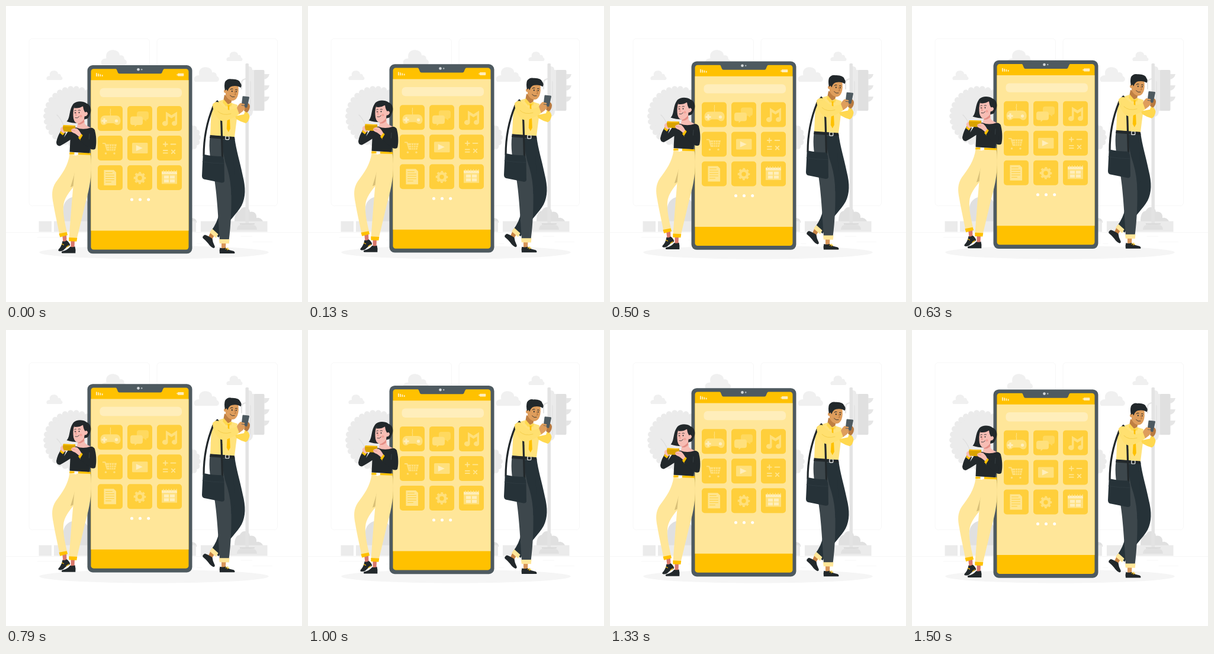
These frames come from a looping animation (500x500 px, 1540 ms). An HTML page:

```html
<!DOCTYPE html>
<html lang="en">
<head>
<meta charset="utf-8">
<title>Phone apps</title>
<style>
html, body { margin: 0; width: 100%; height: 100%; overflow: hidden; background: #fff; }
svg { display: block; width: 100vw; height: 100vh; }
.ln { fill: none; stroke-linecap: round; stroke-linejoin: round; }
</style>
</head>
<body>
<svg viewBox="0 0 500 500">
  <defs>
    <path id="cloud" d="M1.500 16C-1.500 12 2 9 6 9C4.500 3 9-.5 14 .3C19 1 20 4 20 6C24 5 25 8 25 10C28 11 28.500 15 25.500 16Z"/>
  </defs>

  <!-- scenery -->
  <g fill="none" stroke="#ebebeb" stroke-width=".4">
    <rect x="39" y="55" width="203.500" height="282.600" rx="5.500"/>
    <rect x="255" y="55" width="203.500" height="282.600" rx="5.500"/>
    <path d="M0 382.500H500M416.800 398.600h33M322.500 401.300h8.700M396.600 389.300h19M52.500 391h43M131.500 395.200h93"/>
  </g>
  <g fill="#f0f0f0">
    <use href="#cloud" transform="translate(68 109)"/>
    <use href="#cloud" transform="translate(160 74) scale(1.600)"/>
    <use href="#cloud" transform="translate(372 77)"/>
    <use href="#cloud" transform="translate(317 103) scale(1.560)"/>
  </g>
  <g id="trees" fill="#ebebeb"></g>
  <path class="ln" d="M86 184Q92 189 97 201" stroke="#dedede" stroke-width="1.300"/>
  <g fill="#e0e0e0">
    <path d="M97 364V341C98 327 111 320 124 322C134 323 140 331 140 340V364Z"/>
    <path d="M313 358q9 0 9 8h-9z"/>
    <path d="M386 364C386 354 388 347 395 346C399 337 411 338 412 348C419 346 424 351 423 358C428 357 433 360 434 364Z"/>
  </g>
  <g fill="#ebebeb">
    <rect x="55.500" y="363.500" width="21.500" height="18"/>
    <rect x="81" y="363.500" width="60" height="18"/>
    <rect x="313" y="363.500" width="8" height="18"/>
    <rect x="329" y="363.500" width="112.500" height="18"/>
  </g>
  <rect x="404.500" y="97" width="5.500" height="274" rx="1.500" fill="#e3e3e3"/>
  <path d="M390 378q0-9 10-9h14q10 0 10 9z" fill="#e0e0e0"/>
  <path d="M395 367h25v2h-25z" fill="#dadada"/>
  <path d="M410 102q6 0 6 6h6v69h-5q0 9-7 10z" fill="#ebebeb"/>
  <rect x="419" y="108" width="17.500" height="69" rx="2" fill="#e0e0e0"/>
  <path d="M436 115h9q-2 8-9 9zM436 134h9q-2 8-9 9zM436 153h9q-2 8-9 9z" fill="#e6e6e6"/>
  <path class="ln" d="M398 140v-10q0-6 7-7M413 128v48" stroke="#e4e4e4" stroke-width="2"/>
  <ellipse cx="250" cy="416.200" rx="193.900" ry="11.300" fill="#f5f5f5"/>

  <g id="float">
    <!-- phone -->
    <rect x="137.500" y="100" width="177" height="318.300" rx="9" fill="#4e5a60"/>
    <rect x="143.500" y="106.300" width="165" height="305.200" rx="4.500" fill="#ffc100"/>
    <path d="M143.500 125.300h165V379.500h-165z" fill="#ffe699"/>
    <path d="M185 105.500h83q-2 .5-3.200 3.800l-1.300 3.200q-.6 1.800-2.500 1.800h-69.500q-1.900 0-2.500-1.800l-1.300-3.200q-1-3.300-2.700-3.800z" fill="#4e5a60"/>
    <circle cx="223.500" cy="107.200" r="2.300" fill="#d4d8da"/>
    <circle cx="229.200" cy="107.200" r="1.300" fill="#aab2b6"/>
    <g fill="#ffeebb">
      <path d="M152 113.300h1.800v5.700h-1.800zM155.200 114.200h1.800v4.800h-1.800zM158.400 115.200h1.800v3.800h-1.800zM161.800 116.200h1.800v2.800h-1.800z"/>
      <rect x="290" y="113.800" width="10.300" height="4.800" rx=".8"/>
      <rect x="288.300" y="115.200" width="1.500" height="2" rx=".5"/>
      <rect x="158.500" y="138.700" width="138.500" height="15.300" rx="6"/>
    </g>
    <g id="tiles" fill="#ffcf3b"></g>

    <g fill="#ffe07c">
      <path d="M167 185h19c5 0 7.500 4 7.500 8.500s-2 7.500-5.500 7.500c-4 0-4-3-7-3h-9c-3 0-3 3-7 3c-3.500 0-5.500-3-5.500-7.500s2.500-8.500 7.500-8.500z"/>
      <path class="ln" d="M176.500 185v-4q-1-1 0-3v-4" stroke="#ffe07c" stroke-width="1.200"/>
      <path d="M164.500 189.500h3v3h3v3h-3v3h-3v-3h-3v-3h3z" fill="#ffeebb"/>
      <circle cx="186.500" cy="194" r="2.600" fill="#ffeebb"/>
      <path d="M225 178h12q4 0 4 4v6q0 4-4 4v3l-4-3h-8q-4 0-4-4v-6q0-4 4-4z" fill="#ffd95f"/>
      <path d="M214 186.500h13q4 0 4 4v6.500q0 4-4 4h-6l-3.500 3v-3h-3.500q-4 0-4-4v-6.500q0-4 4-4z"/>
      <path d="M270 178.500l9.500 6l9.500-6v19.500a4.500 4 0 1 1-3.500-3.600v-8.400l-6 3.800l-6-3.800v12a4.800 4.200 0 1 1-3.500-3.600z"/>
      <path d="M163 231.200h5l1 2.300h18l-2.500 11h-14.500l-3.400-11.500h-3.600z"/>
      <path class="ln" d="M170 237.300h15.500M171 241h14M174.500 234.500l1 9.500M178.500 234.500v9.500M182.500 234.500l-1 9.500" stroke="#ffcf3b" stroke-width=".9"/>
      <circle cx="168.500" cy="249" r="1.700"/><circle cx="183" cy="249" r="1.700"/>
      <rect x="213" y="231" width="26.500" height="18" rx="1.500"/>
      <path d="M219.800 235l11 5l-11 5z" fill="#ffeebb"/>
      <path class="ln" d="M269.300 230v7M265.800 233.500h7M278.500 233.500h8M265.800 244h7M265.800 248.300h7M279.800 243.500l5.500 5.500M285.300 243.500l-5.500 5.500" stroke="#ffe58f" stroke-width="1.800"/>
      <path d="M165.500 277h16.500l4 4v22h-20.500z" fill="#ffe58f"/>
      <path class="ln" d="M168.500 281.500h11M168.500 285.500h14M168.500 289.500h14M168.500 293.500h14M168.500 297.500h9" stroke="#ffcf3b" stroke-width="1"/>
      <circle cx="226" cy="290.500" r="6" fill="none" stroke="#ffe07c" stroke-width="4.500"/>
      <circle cx="226" cy="290.500" r="9" fill="none" stroke="#ffe07c" stroke-width="2.600" stroke-dasharray="3.800 3.269" stroke-dashoffset="1.900"/>
      <path d="M263 279.500h26v21h-26z"/>
      <path d="M263 279.500h26v4.500h-26z" fill="#ffeebb"/>
      <path class="ln" d="M266 277.800v3M270.500 277.800v3M275 277.800v3M279.500 277.800v3M284 277.800v3M288 277.800v3" stroke="#ffe58f" stroke-width="1.300"/>
      <path d="M267 286.500h8v5h-8zM277 286.500h8v5h-8zM267 293h8v5h-8zM277 293h8v5h-8z" fill="#ffeebb"/>
    </g>
    <g fill="#fff">
      <circle cx="212.500" cy="327" r="2.500"/><circle cx="226.500" cy="327" r="2.500"/><circle cx="240.700" cy="327" r="2.500"/>
    </g>

    <!-- woman -->
    <g>
      <path d="M95 386l7-1l.5 12l-6 2z" fill="#d9786b"/>
      <path d="M109.500 396h6.500l-.5 12h-6z" fill="#d9786b"/>
      <path d="M95.500 397q3 2 7-1q2 1 4 4q2.500 3 1 5q-5 2-9 6q-3 3.500-8 3.200q-3.500-.5-1.500-3.200q5-5 6.500-14z" fill="#22282b"/>
      <path d="M108.500 406.500q4 1.500 8-.3q1.500 5 .8 11.300h-22.500q-2-1.500 0-3q9-2 13.700-8z" fill="#22282b"/>
      <path class="ln" d="M94.500 402l3 1.500M102 407.500l4-3" stroke="#ffc100" stroke-width="1.200"/>
      <path d="M107.500 250C105 270 95 283 84 298C77 309 77 319 80 334C83 352 87 368 90.500 387L103.500 384C99 365 96 350 97 338C98 325 106 315 116 303L128 255Z" fill="#ffe699"/>
      <path d="M118 268C117 283 112 295 109 306L119 302Z" fill="#d9c078"/>
      <path d="M119 250C116 275 114 300 112 322C110 345 108 372 106.500 393L119.500 394C126 368 131 345 137 322C143 300 146 275 142.500 250Z" fill="#ffe699"/>
      <path d="M89.500 384.500l13-2.500l1.700 5l-13 3.500zM106.300 391l14 .8l-1 6l-13-.6z" fill="#ffc100"/>
      <path d="M107.500 247l35 1.300l.8 3.500l-36.300-1.300z" fill="#ffc100"/>
      <rect x="115.500" y="246.700" width="6.500" height="5" rx="1" fill="#fff"/>
      <!-- hair, face -->
      <path d="M114 165C119 160 130 160 136 164.500C144 167 145 178 141.500 183C140 188 138 191 134 191L121 198C115 198 108 197 102.500 195C109 189 106 175 114 165Z" fill="#22282b"/>
      <path d="M121 192L132 187L133 199Q136 203 145 206L134 212L118 207Q122 203 121 192Z" fill="#f7bdb4"/>
      <path d="M121.500 197Q128 197 132 191V196Q127 201 121.500 200Z" fill="#e58f86"/>
      <path d="M115 171C120 170 128 168 132 170Q132 175 133.500 179Q138 178 138 182.500Q136 187 133 186Q131 195 123 198.500Q116 199 114 190Q112.500 180 115 171Z" fill="#f7bdb4"/>
      <path d="M114 172Q123 174 130 169Q131 177 134 180L139 170L128 163Z" fill="#22282b"/>
      <g class="ln" stroke="#22282b" stroke-width=".8">
        <path d="M115.500 177q1.500-1.500 3-.7M122 176.300q2-1 3.500 0"/>
        <path d="M119 179.500l-1.500 5h1.800" stroke="#e07f76"/>
        <path d="M117 188.800q4 1.500 6.500-2"/>
      </g>
      <ellipse cx="116.800" cy="180.300" rx=".8" ry="1.200" fill="#22282b"/>
      <ellipse cx="123.500" cy="180" rx=".8" ry="1.200" fill="#22282b"/>
      <circle cx="126.500" cy="186" r="2" fill="#f2a097"/>
      <!-- top and arms -->
      <path d="M109 206Q114 205 119 205.500Q130 210 143 205.500Q150 206 150.500 212C153 222 153 234 151 241Q148 244 142 241L140.500 248.500L107.500 246.500L108.500 226Q98 233 91 236.500Q85 236 85 230Q87 219 94 209L101 214L98 222Z" fill="#22282b"/>
      <path d="M141 216Q139 228 141 240M130 225l10 11" class="ln" stroke="#3b4448" stroke-width=".8"/>
      <path d="M94 208.500l5.500 5.500l-3.500 4.500l-5-4z" fill="#ffc100"/>
      <path d="M92 210Q91 206 95 204L101 207Q102 212 98 215Q94 214 92 210Z" fill="#f7bdb4"/>
      <path d="M97 201.300L117 202Q118 207 114.500 213L98 212Q94.500 207 97 201.300Z" fill="#d9a200"/>
      <path d="M97 201.300L117 202L114 203.500L96 203Z" fill="#ffc100"/>
      <path d="M110 209Q114 205.500 120 207Q124 210 127.500 217L124 222Q119 216 114 214.500Q110 213 110 209Z" fill="#f7bdb4"/>
      <path d="M111 209.500l5.500 1.300" class="ln" stroke="#e58f86" stroke-width=".8"/>
      <path d="M122 222.500l5.500-6.500l3 3.500l-4.500 8z" fill="#ffc100"/>
      <path d="M130 218Q138 225 147 229L146 242Q135 238 125 226Z" fill="#22282b"/>
    </g>

    <!-- man -->
    <g>
      <path d="M346 381l7 5l-5 8l-6-4z" fill="#c98546"/>
      <path d="M364 398h7.500l-.5 12h-7z" fill="#d9975a"/>
      <path d="M336 386.500q4 1 6 2.500q4 2 6.500 4q.5 6 4 12.500q1 3-2 3.500q-5-2-9-8q-4-5-9-9q-1.500-3 3.500-5.500z" fill="#22282b"/>
      <path d="M361.300 408.500q5 1.500 9.500 0q5 4 13.700 5.500q3 2 1.500 4h-25q-1-5 .3-9.500z" fill="#22282b"/>
      <path class="ln" d="M371 410.500l4-1.700M373.500 412l3-1.500" stroke="#ffc100" stroke-width="1.100"/>
      <path d="M362 223L386 222C389 245 395 262 400 287C405 307 405 323 398 337C390 351 376 363 369 376L359 391L346.500 380Q357 366 360 350Z" fill="#263238"/>
      <path d="M348.500 376.500l10 9l-3.500 6.500l-11-9.500z" fill="#ffe699"/>
      <path d="M344.500 221C342 240 345 260 350 282C356 310 358 350 361 396H376.500C380 370 381 340 380.500 315L379 223Z" fill="#3d474c"/>
      <path d="M366 226Q365 250 374 275Q380 295 380.500 320L387 300L382 225Z" fill="#263238"/>
      <path d="M360 394h17.500l-.7 7.300l-16-.3z" fill="#ffe699"/>
      <path d="M344.800 217.500L385.800 220.500L386.500 226L344 223Z" fill="#22282b"/>
      <rect x="370.800" y="219.800" width="6" height="5.800" rx="1" fill="#22282b" stroke="#fff" stroke-width="1.200"/>

      <!-- neck, shirt -->
      <path d="M369 150L382 156L380 165L374 168L367 161Z" fill="#bf7f43"/>
      <path d="M368 158L358 161Q350 162 347 173L345 218L386 221L390 190L391 167L380 163.500L374 167Z" fill="#ffe27c"/>
      <path d="M387 186L402 183L404 177Q411 181 411.500 187Q410 196 405 198Q397 196 389 191Z" fill="#ffd84f"/>
      <path d="M368 158L366 163L372 170L375.500 167L380 170L382 164L375 166Z" fill="#ffd84f"/>
      <path d="M374 167.500h4l-.8 4l1.600 36l-3 5.500l-3-5.500l2-36z" fill="#ffc100"/>
      <!-- head -->
      <path d="M371 135L392 132Q394 146 391 153Q388 160 382 160Q375 159 371 151Z" fill="#de9d5c"/>
      <circle cx="371" cy="144" r="3" fill="#de9d5c"/>
      <path d="M370 143Q368 134 370 128Q374 122 381 123.500Q394 123 396 130Q399 134 396.500 138Q391 134 382 135.500Q376 137 374.500 144L372.500 141Z" fill="#22282b"/>
      <g class="ln" stroke="#22282b" stroke-width="1">
        <path d="M379 141q2-2 4-1M387.500 141.300q2-1 3 .3"/>
        <path d="M386 144l2.200 5.500l-2.200.3" stroke="#a9662e" stroke-width=".8"/>
        <path d="M378.500 151q3 4 7.500 2.500" stroke-width=".8"/>
      </g>
      <ellipse cx="381.800" cy="144" rx=".9" ry="1.300" fill="#22282b"/>
      <ellipse cx="388.800" cy="144.500" rx=".8" ry="1.200" fill="#22282b"/>
      <!-- bag -->
      <path class="ln" d="M334 253C334 222 340 194 350 170L357 161Q364 178 364 202L365.500 256" stroke="#22282b" stroke-width="3.200"/>
      <path d="M335.500 251Q348 254 365 254Q368 256 368.500 264L369 296Q368 299 364 298.500L334 292.500Q331 291 331 287L332.500 255Q333 251 335.500 251Z" fill="#263238"/>
      <path d="M332 263Q350 266 368 266" class="ln" stroke="#303d43" stroke-width=".8"/>
      <!-- arms, handset -->
      <path d="M405 164Q411 163 412 169Q412 176 407 180L402 177Z" fill="#b87a40"/>
      <path d="M349 166Q354 160 360 163Q368 172 377 176L391 172L395 182Q381 192 368 194.500Q361 195 356 187Q349 177 349 166Z" fill="#ffe070"/>
      <path d="M358 178Q366 186 380 182" class="ln" stroke="#f2c944" stroke-width=".8"/>
      <path d="M390 172Q392 166 397 164L403 166Q405 173 400 178L394 182.500Z" fill="#de9d5c"/>
      <path d="M400.800 152.300L410 153.300Q411.200 153.500 411 154.800L407.500 170.500Q407 172 405.500 171.700L398.500 170Q397.300 169.700 397.600 168.500L399.500 153.300Q399.700 152.200 400.800 152.300Z" fill="#4e5a60"/>
      <path class="ln" d="M396 165.500l6 1M396 169l6 1M396.500 172.500l5.500 .5" stroke="#de9d5c" stroke-width="2.600"/>
    </g>
  </g>
</svg>
<script>
const NS = "http://www.w3.org/2000/svg";
const LOOP = 1540, LEAD = 35, RISE = 10;
const byId = id => document.getElementById(id);

function add(parent, tag, attrs) {
  const el = document.createElementNS(NS, tag);
  for (const key in attrs) el.setAttribute(key, attrs[key]);
  parent.appendChild(el);
}

// Round crown with a scalloped rim
function crown(cx, cy, r, bumps) {
  const trees = byId("trees");
  add(trees, "circle", { cx, cy, r });
  for (let i = 0; i < bumps; i++) {
    const a = i / bumps * Math.PI * 2;
    add(trees, "circle", { cx: cx + r * Math.cos(a), cy: cy + r * Math.sin(a), r: 5 });
  }
}
crown(114, 186, 46, 30);
crown(304, 222, 20, 15);

for (let i = 0; i < 9; i++) {
  add(byId("tiles"), "rect", {
    x: 155 + i % 3 * 50, y: 169 + Math.floor(i / 3) * 50, width: 42, height: 42, rx: 5
  });
}

// Linear rise and fall
const lift = t => {
  const p = (t + LEAD) % LOOP / LOOP;
  return RISE * (1 - Math.abs(1 - 2 * p));
};

const figure = byId("float");
function draw(t) {
  figure.setAttribute("transform", `translate(0 ${(lift(0) - lift(t)).toFixed(3)})`);
}

let start = null;
function tick(now) {
  if (start === null) start = now;
  draw((now - start) % LOOP);
  requestAnimationFrame(tick);
}
draw(0);
requestAnimationFrame(tick);
</script>
</body>
</html>
```
